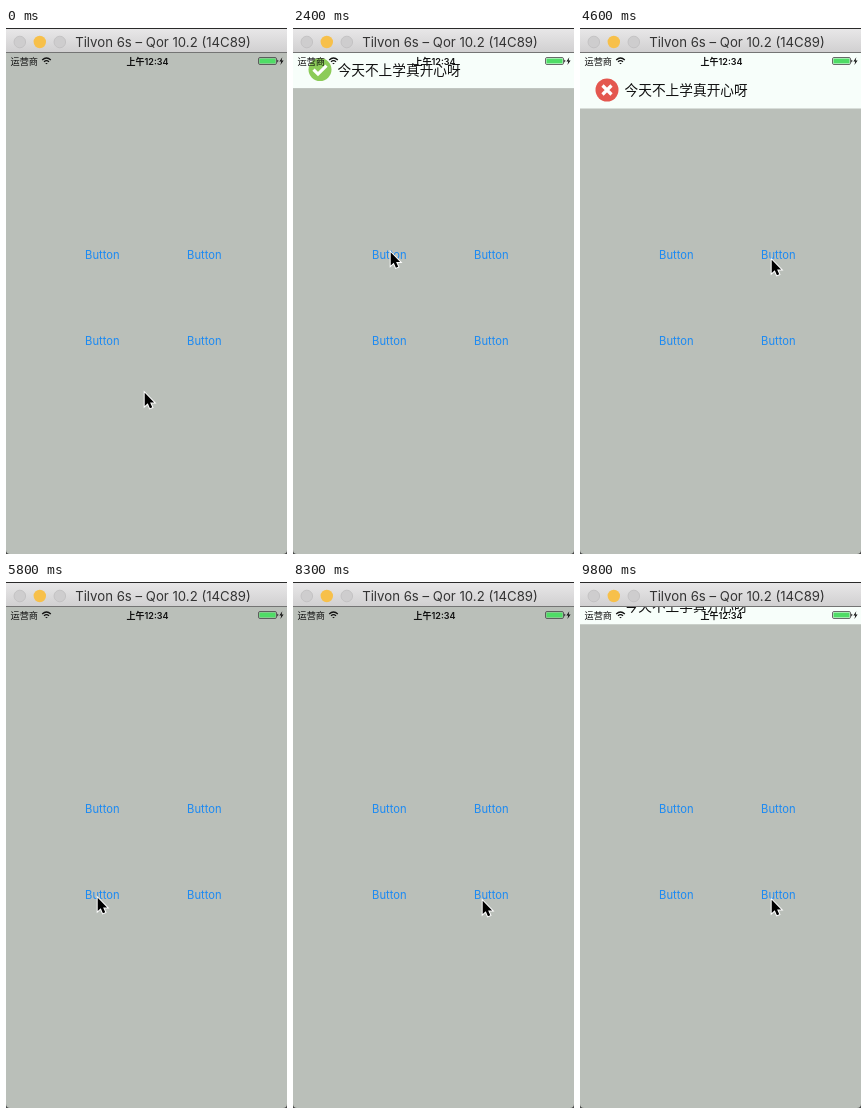
These frames come from a looping animation (281x526 px, 9900 ms). An HTML page:

```html
<!DOCTYPE html>
<html lang="zh">
<head>
<meta charset="utf-8">
<title>Drop-down notice</title>
<style>
html, body { margin: 0; width: 100%; height: 100%; overflow: hidden; background: #babfb9; }
svg { display: block; width: 100vw; height: 100vh; }
text { font-family: Inter, "Noto Sans CJK SC", "Noto Sans CJK", sans-serif; }
.cjk { font-family: "Noto Sans CJK SC", "Noto Sans CJK", sans-serif; }
.btn { font-size: 11.2px; fill: #1c8af3; text-anchor: middle; }
.mark { fill: none; stroke: #fff; stroke-width: 3.2; }
</style>
</head>
<body>
<svg viewBox="0 0 281 526" preserveAspectRatio="none">
  <defs>
    <linearGradient id="bar" x2="0" y2="1">
      <stop offset="0" stop-color="#e9e8e9"/>
      <stop offset="1" stop-color="#d0cfd0"/>
    </linearGradient>
  </defs>
  <rect width="281" height="526" fill="#babfb9"/>
  <g id="buttons"></g>

  <g id="banner">
    <rect y="25" width="281" height="55.5" fill="#f7fefa"/>
    <g transform="translate(27 62)">
      <g class="icon">
        <circle r="11.5" fill="#8ccb58"/>
        <path class="mark" d="M-6.5 0L-2 4.5L6.5-4"/>
      </g>
      <g class="icon">
        <circle r="11.5" fill="#e4574f"/>
        <path class="mark" d="M-4.5-4.5L4.5 4.5M4.5-4.5L-4.5 4.5"/>
      </g>
      <g class="icon">
        <circle r="11.5" fill="#30bdee"/>
        <circle cy="-5.5" r="2.1" fill="#fff"/>
        <path fill="#fff" d="M-3.5-2H2V5H3.8V7.5H-3.8V5H-2V.5H-3.5Z"/>
      </g>
    </g>
    <text class="cjk" x="44.5" y="67.3" font-size="13.7" fill="#111">今天不上学真开心呀</text>
  </g>

  <g id="status">
    <text class="cjk" x="4.5" y="36.6" font-size="9.2" fill="#111">运营商</text>
    <g fill="none" stroke="#111" stroke-width="1.3">
      <path d="M36.2 32Q40.5 27.9 44.8 32M38 33.9Q40.5 31.4 43 33.9"/>
      <path d="M39.2 34.9L40.5 36.3L41.8 34.9Z" fill="#111" stroke="none"/>
    </g>
    <text x="141.5" y="36.5" font-size="9" font-weight="600" text-anchor="middle" fill="#111">上午12:34</text>
    <rect x="252.5" y="29.5" width="18" height="7" rx="1.5" fill="none" stroke="#444" stroke-width=".8"/>
    <rect x="253.4" y="30.4" width="16.2" height="5.2" rx=".7" fill="#4fdc66"/>
    <rect x="271.1" y="31.7" width="1.1" height="2.6" rx=".5" fill="#444"/>
    <path d="M276.3 29.2L273.4 33.6H275.3L274.4 37L277.6 32.4H275.6Z" fill="#111"/>
  </g>

  <rect width="281" height="25" fill="url(#bar)"/>
  <rect width="281" height="1" fill="#2a2a2a"/>
  <rect y="24" width="281" height="1" fill="#747474"/>
  <g stroke-width=".8">
    <circle cx="13.8" cy="14" r="5.8" fill="#cecdce" stroke="#bfbebf"/>
    <circle cx="33.8" cy="14" r="6.2" fill="#f7c04a"/>
    <circle cx="53.8" cy="14" r="5.8" fill="#cecdce" stroke="#bfbebf"/>
  </g>
  <text x="157" y="18.8" font-size="13.2" text-anchor="middle" fill="#333">Tilvon 6s – Qor 10.2 (14C89)</text>

  <path d="M0 522V526H4Q0 526 0 522ZM281 522V526H277Q281 526 281 522Z" fill="#444"/>
  <g id="cursor">
    <path transform="translate(.7 .8) scale(.9)" d="M0 0V14.6L3.4 11.6L5.8 17.2L8.4 16.1L6 10.7H10.5Z"
      fill="#000" stroke="#fff" stroke-width="2.2" paint-order="stroke"/>
  </g>
</svg>
<script>
const LOOP = 9900, STEP = 100;
const SLIDE_IN = 250, HOLD = 1050, SLIDE_OUT = 350, HEIGHT = 55.5;

// Moment each button's banner starts to drop.
const drops = [1200, 3850, 6062, 8538];
const spots = [[96.3, 231.4], [198.3, 231.4], [96.3, 317.4], [198.3, 317.4]];

// Pointer moves: start, end, x, y.
const moves = [
  [0, 0, 138, 364],
  [50, 800, 97, 223.5],
  [2850, 3600, 191, 231],
  [5100, 5750, 91, 315],
  [7350, 8100, 189, 318],
  [8400, 8600, 191, 317]
];

const $ = id => document.getElementById(id);
const clamp = v => Math.min(1, Math.max(0, v));
const span = (t, from, length) => clamp((t - from) / length);
const easeOut = p => 1 - (1 - p) ** 2;
const easeInOut = p => p < .5 ? 2 * p * p : 1 - 2 * (1 - p) ** 2;

const buttons = spots.map(([x, y]) => {
  const el = document.createElementNS("http://www.w3.org/2000/svg", "text");
  el.setAttribute("class", "btn");
  el.setAttribute("x", x);
  el.setAttribute("y", y);
  el.textContent = "Button";
  return $("buttons").appendChild(el);
});
// The last banner carries text only.
const icons = [...document.querySelectorAll(".icon")];

function buttonOpacity(t, drop) {
  return t < drop - 62 ? 1 : .2 + .8 * span(t, drop + 38, 200);
}

function pointer(t) {
  let [, , x, y] = moves[0];
  for (const [from, to, nx, ny] of moves.slice(1)) {
    const p = easeInOut(span(t, from, to - from));
    x += (nx - x) * p;
    y += (ny - y) * p;
  }
  return [x, y];
}

function draw(t) {
  let shown = 0;
  drops.forEach((drop, i) => {
    buttons[i].setAttribute("opacity", buttonOpacity(t, drop));
    const level = easeOut(span(t, drop, SLIDE_IN)) - easeInOut(span(t, drop + HOLD, SLIDE_OUT));
    icons[i]?.setAttribute("visibility", level > 0 ? "visible" : "hidden");
    shown += level;
  });
  $("banner").setAttribute("transform", `translate(0 ${(shown - 1) * HEIGHT})`);
  $("cursor").setAttribute("transform", `translate(${pointer(t)})`);
}

const start = performance.now();
function tick() {
  const t = (performance.now() - start) % LOOP;
  draw(Math.floor(t / STEP) * STEP);
  requestAnimationFrame(tick);
}
tick();
</script>
</body>
</html>
```
